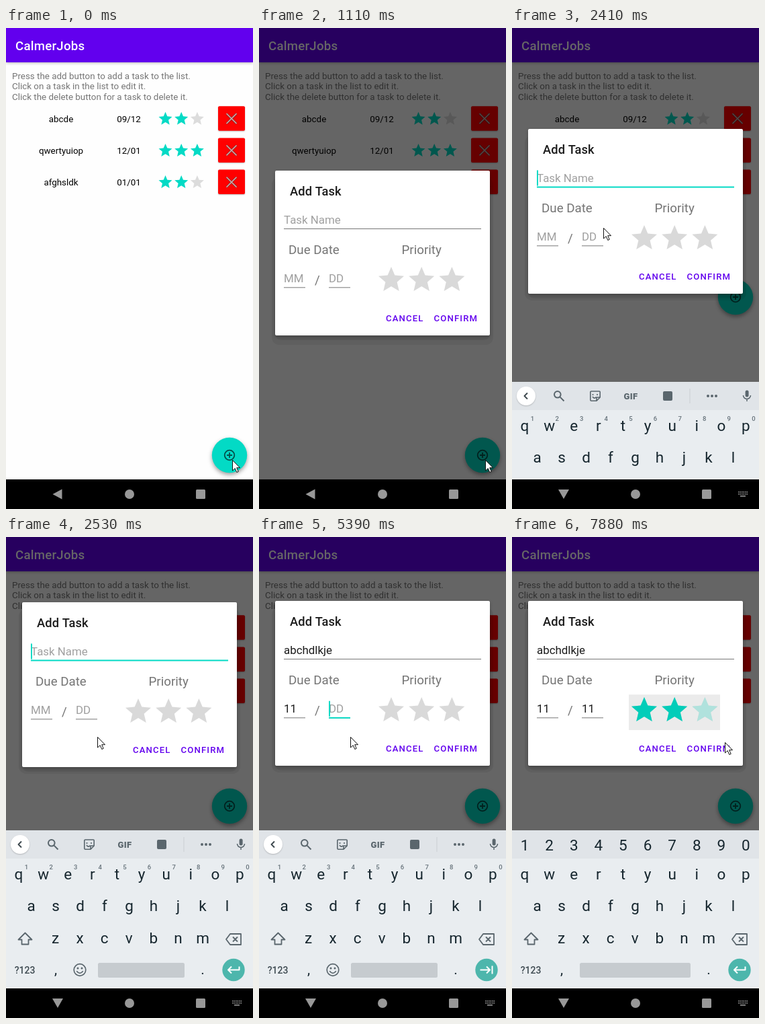
These frames come from a looping animation (368 px wide and 715 px high, 8 s). An HTML page with a canvas:

```html
<!DOCTYPE html>
<html lang="en">
<head>
<meta charset="utf-8">
<title>Task list</title>
<style>
html, body { margin: 0; width: 100%; height: 100%; overflow: hidden; background: #000; }
canvas { display: block; width: 368px; height: 715px; }
</style>
</head>
<body>
<canvas id="stage"></canvas>
<script>
const W = 368, H = 715, LOOP = 8000;
const TEAL = '#03dac5', PURPLE = '#6200ee', KEY = '#16262e', ICON = '#5a666d';
const canvas = document.getElementById('stage');
const dpr = window.devicePixelRatio || 1;
canvas.width = W * dpr;
canvas.height = H * dpr;
const c = canvas.getContext('2d');
const starPath = new Path2D('M0 5.27L6.18 9 4.54 1.97 10 -2.76 2.81 -3.37 0 -10 -2.81 -3.37 -10 -2.76 -4.54 1.97 -6.18 9Z');

// Latest value whose start time has passed.
function at(t, steps) {
  let value = steps[0][1];
  for (const [start, v] of steps) if (t >= start) value = v;
  return value;
}

function rect(x, y, w, h, color, r = 0) {
  c.fillStyle = color;
  c.beginPath();
  c.roundRect(x, y, w, h, r);
  c.fill();
}

function disc(x, y, r, color) {
  c.fillStyle = color;
  c.beginPath();
  c.arc(x, y, r, 0, 7);
  c.fill();
}

function text(s, x, y, size, color, { align = 'left', weight = 400, gap = 0 } = {}) {
  c.font = `${weight} ${size}px Roboto, sans-serif`;
  c.letterSpacing = gap + 'px';
  c.textAlign = align;
  c.fillStyle = color;
  c.fillText(s, x, y);
  return c.measureText(s).width;
}

function draw(path, x, y, { fill, stroke, width = 1.7, scale = 1 }) {
  const p = typeof path === 'string' ? new Path2D(path) : path;
  c.save();
  c.translate(x, y);
  c.scale(scale, scale);
  c.lineJoin = 'round';
  if (fill) { c.fillStyle = fill; c.fill(p); }
  if (stroke) { c.strokeStyle = stroke; c.lineWidth = width; c.stroke(p); }
  c.restore();
}

function shadowed(blur, dy, alpha, paint) {
  c.save();
  c.shadowColor = `rgba(0,0,0,${alpha})`;
  c.shadowBlur = blur * dpr;
  c.shadowOffsetY = dy * dpr;
  paint();
  c.restore();
}

function list() {
  rect(0, 0, W, H, '#fefefe');
  shadowed(4, 1, .3, () => rect(0, 0, W, 51, PURPLE));
  text('CalmerJobs', 14, 32.5, 18.7, '#fff', { weight: 500, gap: .23 });
  ['Press the add button to add a task to the list.',
   'Click on a task in the list to edit it.',
   'Click the delete button for a task to delete it.']
    .forEach((s, i) => text(s, 9, 75.5 + i * 15.7, 13.4, '#757575'));
  [['abcde', '09/12', 2], ['qwertyuiop', '12/01', 3], ['afghsldk', '01/01', 2]].forEach(([name, date, stars], i) => {
    const y = 134.7 + i * 47.2;
    text(name, 82, y + 5, 13.4, '#000', { align: 'center' });
    text(date, 183, y + 5, 13.4, '#000', { align: 'center' });
    for (let k = 0; k < 3; k++) draw(starPath, 237.5 + k * 23.7, y, { fill: k < stars ? TEAL : '#dcdcdc' });
    shadowed(2, 1, .25, () => rect(316, y - 18.5, 40, 36.5, '#f00', 2));
    const cross = 'M-7.5 -7.5L7.5 7.5M7.5 -7.5L-7.5 7.5';
    draw(cross, 336, y, { stroke: '#a81414', width: 3.4 });
    draw(cross, 336, y, { stroke: '#c4a4a4', width: 1.7 });
  });
}

function addButton(y, press) {
  shadowed(6 + press * 3, 3 + press, .38, () => disc(333, y, 26.2, TEAL));
  disc(333, y, 26.2, `rgba(0,0,0,${press * .2})`);
  draw('M-7.3 0A7.3 7.3 0 1 0 7.3 0A7.3 7.3 0 1 0 -7.3 0M-4 0H4M0 -4V4', 333, y, { stroke: '#04524b', width: 1.8 });
}

function field(x, y, w, { value, hint, focus, caret, composing }) {
  const width = value ? text(value, x, y, 16.9, '#1c1c1c') : (text(hint, x, y, 16.9, '#a0a0a0'), 0);
  rect(x, y + 7, w, 1, '#777');
  if (composing && value) rect(x, y + 3, width, 1, '#222');
  if (!focus) return;
  c.globalAlpha = focus;
  rect(x, y + 6.5, w, 2, TEAL);
  if (caret) rect(x + Math.max(0, width - .5), y - 17.5, 2, 23, TEAL);
  c.globalAlpha = 1;
}

function dialog(t, top, typing) {
  const grow = at(t, [[0, 4], [990, 2], [1110, 0]]);
  const drop = t < 2410 ? 14 : 10;
  const shade = (inset, low) => rect(24 - inset, top + 10, 320 + 2 * inset, 235 + low, 'rgba(0,0,0,.06)', 11);
  shade(5 + grow, drop + grow);
  shade(1, 7);
  c.globalAlpha = at(t, [[0, .97], [990, 1]]);
  shadowed(5, 2, .25, () => rect(24, top, 320, 245, '#fff', 2));
  c.globalAlpha = 1;

  text('Add Task', 46, top + 36.5, 18.3, '#1c1c1c', { weight: 500, gap: .1 });
  text('Due Date', 44, top + 124, 18.75, '#757575');
  text('Priority', 212.5, top + 124, 18.75, '#757575');
  text('/', 83, top + 168.5, 18.75, '#757575');
  const button = { weight: 500, gap: 1.17 };
  text('CANCEL', 189, top + 224, 13.1, PURPLE, button);
  text('CONFIRM', 260.5, top + 224, 13.1, PURPLE, button);

  const mm = t >= 4300 && t < 5390, dd = t >= 5390 && t < 6320;
  field(37, top + 79, 294, {
    value: typing, hint: 'Task Name', caret: true, composing: t < 4300,
    focus: t < 4300 ? at(t, [[0, 0], [1890, .5], [2010, 1]]) : 0
  });
  field(37, top + 166.3, 32, {
    value: at(t, [[0, ''], [5140, '1'], [5260, '11']]), hint: 'MM',
    focus: mm, caret: t < 4710 || t >= 5140
  });
  field(104, top + 166.3, 32, {
    value: at(t, [[0, ''], [5670, '1'], [5790, '11']]), hint: 'DD', focus: dd, caret: true
  });

  const chosen = t >= 6320;
  if (chosen) rect(174, top + 139.3, 136, 52.7, '#ebebeb');
  const filled = at(t, [[0, 0], [6720, 1], [7180, 1.5], [7300, 2]]);
  for (let i = 0; i < 3; i++) {
    const spot = [197 + i * 45.2, top + 162];
    draw(starPath, ...spot, { fill: '#d9d9d9', scale: 1.9 });
    c.globalAlpha = at(t, [[0, 0], [6320, .5], [6440, 1]]);
    draw(starPath, ...spot, { fill: '#b0e2dd', scale: 1.9 });
    c.globalAlpha = Math.min(1, Math.max(0, filled - i));
    draw(starPath, ...spot, { fill: '#03cdb9', scale: 1.9 });
    c.globalAlpha = 1;
  }
}

function toolbar(suggesting, typing) {
  shadowed(2, 1, .2, () => disc(21, 457, 14, '#fff'));
  draw(suggesting ? 'M-2 -4.5L2.5 0L-2 4.5' : 'M2 -4.5L-2.5 0L2 4.5', 21, 457, { stroke: '#3c474d', width: 1.9 });
  rect(347.6, 448.5, 5, 10, ICON, 2.5);
  draw('M-5.5 -1A5.5 5.5 0 0 0 5.5 -1M0 4.5V8', 350, 457, { stroke: ICON, width: 1.5 });
  if (suggesting) {
    text(typing, 183, 463, 16.9, ICON, { align: 'center' });
    return;
  }
  draw('M-7 -2.2A4.8 4.8 0 1 0 2.6 -2.2A4.8 4.8 0 1 0 -7 -2.2M1.4 1.4L7.5 7.5', 70, 457, { stroke: ICON, width: 2 });
  draw('M-6 -7H6Q7.2 -7 7.2 -6V2L2 7.2H-6Q-7.2 7 -7.2 6V-6Q-7 -7 -6 -7M7 2H2V7M-4 1Q-1.5 5 1.5 1.5M-3.5 -3V-1M3 -3V-1', 124, 457, { stroke: ICON, width: 1.6 });
  text('GIF', 177, 461.5, 13, ICON, { align: 'center', weight: 900, gap: .3 });
  rect(225, 450, 14, 14, ICON, 2);
  rect(264.5, 446, 1, 22, '#c9ced2');
  for (let i = -1; i < 2; i++) disc(298 + i * 6, 457, 2, ICON);
}

function keyboard(t, offset, typing) {
  const numbers = t >= 6320, mid = { align: 'center' };
  c.save();
  c.beginPath();
  c.rect(0, 436, W, 235);
  c.clip();
  c.translate(0, offset);
  rect(0, 436, W, 235, '#e9edf0');
  rect(0, 436, W, 42, '#e0e4e8');
  if (!numbers) toolbar(t >= 3140 && t < 4300, typing);
  [...'qwertyuiop'].forEach((k, i) => {
    const x = 19 + i * 36.6, digit = (i + 1) % 10;
    text(k, x, 509, 22.5, KEY, mid);
    if (numbers) text(digit, x, 466, 22.5, KEY, mid);
    else text(digit, x + 11.5, 494, 9.5, '#66727a', { align: 'center', weight: 500 });
  });
  [...'asdfghjkl'].forEach((k, i) => text(k, 37.5 + i * 36.5, 556, 22.5, KEY, mid));
  [...'zxcvbnm'].forEach((k, i) => text(k, 73.5 + i * 36.6, 604, 22.5, KEY, mid));
  draw('M0 -9L10 1H5V8H-5V1H-10Z', 28.5, 597.5, { stroke: ICON, width: 1.8 });
  draw('M-5 -8H11V8H-5L-11 0ZM-1 -3.5L6 3.5M6 -3.5L-1 3.5', 339, 598, { stroke: ICON, width: 1.8 });
  text('?123', 28, 649, 14, '#3f4b52', { align: 'center', weight: 500 });
  text(',', 74, 650, 21, KEY, mid);
  text('.', 293, 650, 21, KEY, mid);
  if (!numbers) {
    draw('M-8.8 0A8.8 8.8 0 1 0 8.8 0A8.8 8.8 0 1 0 -8.8 0M-4.8 1.8Q0 8 4.8 1.8', 110, 643.5, { stroke: ICON, width: 1.7 });
    disc(107, 641, 1.5, ICON);
    disc(113, 641, 1.5, ICON);
  }
  const left = numbers ? 101 : 137;
  rect(left, 633, 266 - left, 22, '#c6cbcf', 2.5);
  disc(339, 643.5, 16.7, '#4db6ac');
  const next = t >= 4300 && t < 6320;
  draw(next ? 'M-9.5 0H5M0 -5L5 0L0 5M8.5 -6V6' : 'M8.5 -5V0H-7.5M-3 -5L-8 0L-3 5', 339, 643.5, { stroke: '#fff', width: 2 });
  c.restore();
}

function navBar(t) {
  const gray = '#989898';
  rect(0, 671, W, 44, '#000');
  draw(t < 2410 ? 'M-7.5 0L6.5 -7.5V7.5Z' : 'M-8 -7H8L0 7Z', 77, 693, { fill: gray });
  disc(184, 693, 7, gray);
  rect(283, 686, 14, 14, gray, 1.5);
  if (t < 2290) return;
  for (let i = 0; i < 6; i++)
    for (let j = 0; j < 2; j++) rect(337 + i * 2.5, 689 + j * 3, 1.6, 1.6, gray);
  rect(340, 695, 8, 1.6, gray);
}

function pointer(t) {
  const [x, y] = at(t, [
    [0, [337, 642]], [1380, [262, 484]], [1500, [201, 362]], [1650, [150, 310]],
    [1770, [136, 297]], [7610, [210, 294]], [7730, [297, 298]], [7880, [317, 305]]
  ]);
  draw('M.5 .5V16L4.2 12.6L6.8 18.5L9.2 17.4L6.7 11.7H11.5Z', x, y, { fill: '#fff', stroke: '#111', width: 1 });
}

function render() {
  const t = performance.now() % LOOP;
  c.setTransform(dpr, 0, 0, dpr, 0, 0);
  const typing = at(t, [[0, ''], [3140, 'a'], [3260, 'ab'], [3380, 'abc'], [3500, 'abchd'], [3760, 'abchdlk'], [3880, 'abchdlkje']]);
  const top = at(t, [[0, 212], [2410, 150], [2530, 97], [2650, 95.5], [2770, 95]]);
  list();
  addButton(t < 2410 ? 635 : 400, at(t, [[0, 0], [500, .5], [620, 1], [990, .5], [1110, 0]]));
  rect(0, 0, W, 671, `rgba(0,0,0,${at(t, [[0, 0], [870, .38], [990, .53], [1110, .6]])})`);
  if (t >= 870) dialog(t, top, typing);
  if (t >= 2410) keyboard(t, t < 2530 ? 90 : 0, typing);
  navBar(t);
  pointer(t);
  requestAnimationFrame(render);
}
render();
</script>
</body>
</html>
```
